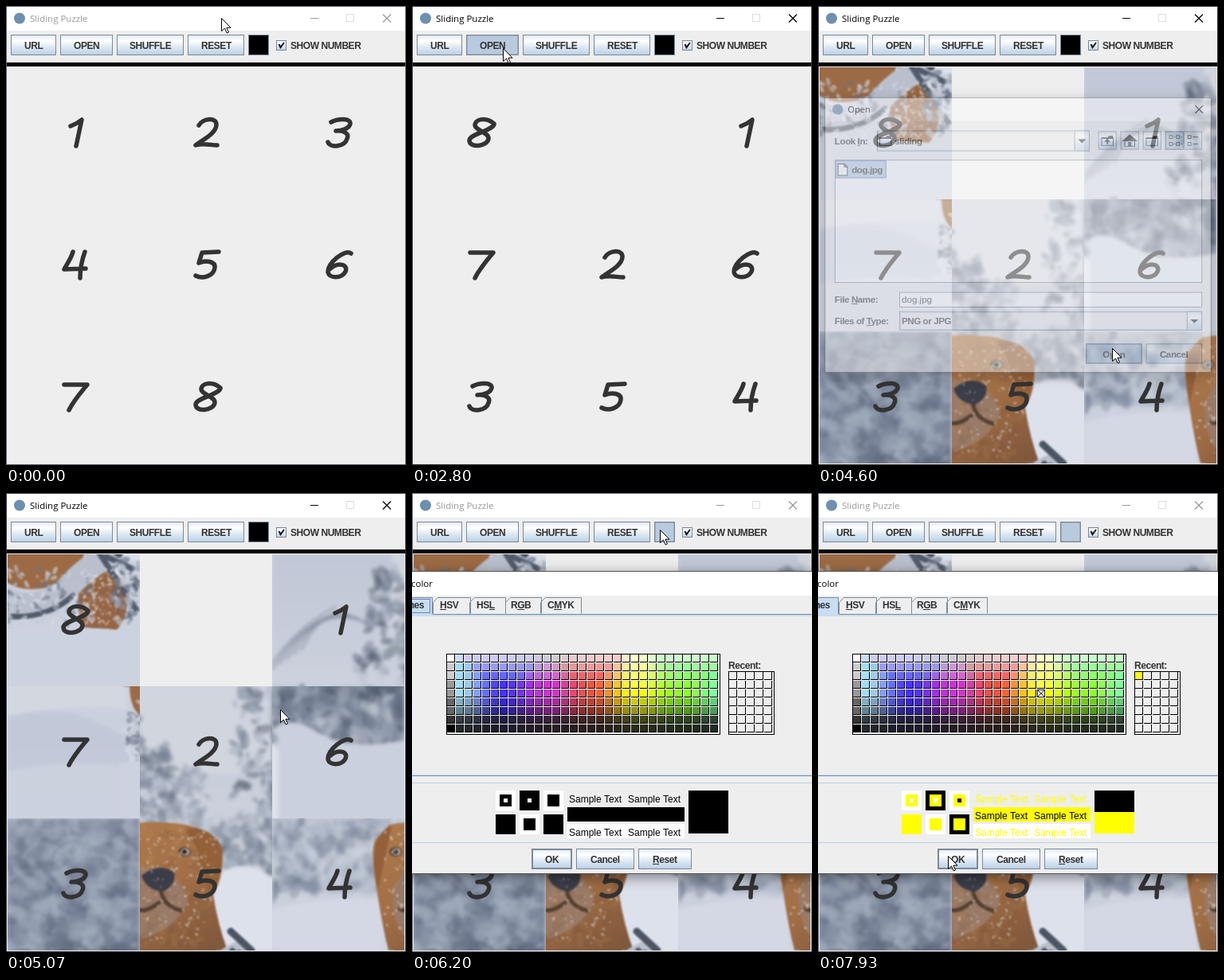
An HTML page with a canvas for the animation above (8 s loop, 502 px wide and 577 px high).

```html
<!DOCTYPE html>
<html lang="en">
<head>
<meta charset="utf-8">
<title>Sliding Puzzle</title>
<style>
html, body { margin: 0; width: 100%; height: 100%; overflow: hidden; background: #eee; }
canvas { display: block; width: 502px; height: 577px; }
</style>
</head>
<body>
<canvas id="stage" width="502" height="577"></canvas>
<script>
const W = 502, H = 577, LOOP = 8000, STEP = 1000 / 15;
const c = document.getElementById('stage').getContext('2d');
const UI = '"Liberation Sans", Arial, sans-serif';
const BOLD = 'bold 12px ' + UI, PLAIN = '12px ' + UI;
const CAPTION = '11.5px "Open Sans", "Noto Sans", sans-serif';
const EDGE = '#7a8a99', PALE = '#b8cfe5', DOWN = '#b9cade', FACE = '#eeeeee', INK = '#333';

// ---- basic helpers ----
function rect(x, y, w, h, fill) { c.fillStyle = fill; c.fillRect(x, y, w, h); }
function frame(x, y, w, h, color, n = 1) {
  c.strokeStyle = color;
  c.lineWidth = n;
  c.strokeRect(x + n / 2, y + n / 2, w - n, h - n);
}
function box(x, y, w, h, fill, edge = EDGE) { rect(x, y, w, h, fill); frame(x, y, w, h, edge); }
function line(color, width, ...p) {
  c.strokeStyle = color;
  c.lineWidth = width;
  c.beginPath();
  for (let i = 0; i < p.length; i += 2) c.lineTo(p[i], p[i + 1]);
  c.stroke();
}
function poly(color, ...p) {
  c.fillStyle = color;
  c.beginPath();
  for (let i = 0; i < p.length; i += 2) c.lineTo(p[i], p[i + 1]);
  c.fill();
}
function text(s, x, y, { font = BOLD, color = INK, align = 'left', mark = -1 } = {}) {
  c.font = font;
  c.letterSpacing = font === BOLD ? '-0.45px' : '0px';
  c.fillStyle = color;
  const w = c.measureText(s).width;
  if (align === 'center') x = Math.round(x - w / 2);
  if (align === 'right') x -= w;
  c.fillText(s, x, y);
  if (mark >= 0) {
    const a = c.measureText(s.slice(0, mark)).width, b = c.measureText(s[mark]).width;
    c.fillRect(Math.round(x + a), y + 1, Math.round(b), 1);
  }
}
function sheen(y, h) {
  const g = c.createLinearGradient(0, y, 0, y + h);
  g.addColorStop(0, '#dde8f3');
  g.addColorStop(.3, '#fff');
  g.addColorStop(.6, '#dde8f3');
  g.addColorStop(1, PALE);
  return g;
}
function button(x, y, w, h, label, state, mark) {
  box(x, y, w, h, state === 'down' ? DOWN : sheen(y, h));
  if (state === 'over') frame(x + 1, y + 1, w - 2, h - 2, PALE, 2);
  if (state === 'main' || state === 'down') frame(x, y, w, h, EDGE, state === 'main' ? 2 : 1.4);
  if (label) text(label, x + w / 2, y + 18, { align: 'center', mark });
}
function cross(x, y, color) {
  line(color, 1.2, x, y, x + 10, y + 10);
  line(color, 1.2, x + 10, y, x, y + 10);
}
function badge(y) {
  c.fillStyle = '#6d8fb0';
  c.beginPath();
  c.arc(17, y, 7, 0, 7);
  c.fill();
}

// ---- picture ----
function makePhoto() {
  const SIZE = 498;
  const sheet = () => {
    const cv = document.createElement('canvas');
    cv.width = cv.height = SIZE;
    return cv;
  };
  const out = sheet(), o = out.getContext('2d');
  let g, seed = 7;
  const layer = (blur, paint) => {
    const cv = sheet();
    g = cv.getContext('2d');
    g.lineCap = 'round';
    paint();
    o.filter = `blur(${blur}px)`;
    o.drawImage(cv, 0, 0);
    o.filter = 'none';
  };
  const rnd = () => (seed = seed * 16807 % 2147483647) / 2147483647;
  const blob = (x, y, rx, ry, color, turn = 0) => {
    g.fillStyle = color;
    g.beginPath();
    g.ellipse(x, y, rx, ry, turn, 0, 7);
    g.fill();
  };
  const scatter = (n, x, y, w, h, r, colors, alpha = .4) => {
    g.globalAlpha = alpha;
    for (let i = 0; i < n; i++) {
      const s = r * (.4 + rnd());
      blob(x + rnd() * w, y + rnd() * h, s, s * .5, colors[i % colors.length], rnd() * 3);
    }
    g.globalAlpha = 1;
  };
  // a tree narrows towards its tip
  const tree = (x, y, w, h, colors) => {
    for (let k = 0; k < 6; k++) {
      const s = w * (.35 + k * .13);
      scatter(18, x + (w - s) / 2, y + h * k / 6, s, h / 6, 9, colors, .45);
    }
  };
  const shape = (d, color) => { g.fillStyle = color; g.fill(new Path2D(d)); };
  const stroke = (d, color, w) => {
    g.strokeStyle = color;
    g.lineWidth = w;
    g.stroke(new Path2D(d));
  };

  o.fillStyle = '#cdd2de';
  o.fillRect(0, 0, SIZE, SIZE);
  layer(2.2, () => {
    const sky = g.createLinearGradient(0, 0, 0, SIZE);
    sky.addColorStop(0, '#c0c7d6');
    sky.addColorStop(.3, '#cbd0dc');
    sky.addColorStop(1, '#ccd1df');
    g.fillStyle = sky;
    g.fillRect(-9, -9, 520, 520);
    shape('M150,-9 H332 V110 H150Z', '#d0d5de');
    for (let i = 0; i < 6; i++)
      stroke(`M${i * 9 - 8},${150 - i * 6} Q${24 + i * 9},${95 - i * 9} ${80 + i * 9},${66 + i * 5}`, 'rgba(128,138,156,.6)', 2.4);
    const fir = ['#4f596a', '#9aa3b3', '#cdd3dd', '#69748a'];
    tree(106, 20, 78, 135, fir);
    tree(150, 75, 78, 130, ['#7c8698', '#b6bdca', '#667083']);
    tree(196, 100, 70, 110, ['#aab2c1', '#d0d5de', '#8690a2']);
    tree(262, -20, 88, 240, fir);
    shape('M-9,148 Q70,142 166,154 V172 H-9Z', 'rgba(206,211,223,.8)');

    shape('M332,-9 H510 V240 H332Z', '#858fa3');
    scatter(330, 332, -5, 170, 172, 13, ['#5b657a', '#9ea8bb', '#78839a', '#b0b9c9'], .35);
    for (let i = 0; i < 9; i++)
      stroke(`M${335 + i * 16},${20 + rnd() * 120} q${20 + rnd() * 20},${-20 - rnd() * 20} 60,${rnd() * 30 - 15}`, 'rgba(180,189,204,.5)', 2.5);
    scatter(130, 332, 164, 166, 78, 14, ['#454f61', '#9ca5b6', '#c4cad7', '#5f6a7e'], .4);
    shape('M332,222 Q352,200 386,222 Q430,250 505,232 V340 H332Z', '#cad0dd');
    shape('M-9,166 H150 V260 H-9Z', '#b0b9c8');
    scatter(150, -5, 168, 150, 95, 12, ['#848fa3', '#c0c7d3', '#717c90', '#d2d7e1'], .38);
    shape('M-9,284 Q60,262 140,268 V340 H-9Z', '#d3d8e4');
    scatter(80, 258, 166, 78, 62, 10, ['#6a7588', '#c3cad5', '#8e98a9']);
    shape('M246,262 Q266,222 300,226 Q322,230 340,246 V340 H246Z', '#dde1eb');
    shape('M-9,328 H150 V360 Q70,352 -9,374Z', '#d2d7e0');
    shape('M-9,372 Q60,352 110,376 T170,410 V436 Q80,420 -9,440Z', 'rgba(178,187,205,.4)');
  });

  layer(1, () => {
    const coat = g.createLinearGradient(150, 170, 250, 332);
    coat.addColorStop(0, '#ad7a4d');
    coat.addColorStop(.5, '#a26f46');
    coat.addColorStop(1, '#80583c');
    shape('M147,174 Q180,168 208,172 Q252,176 268,200 Q274,235 258,262 Q264,300 276,332 H146 Q138,300 132,260 Q122,205 130,192Z', coat);
    shape('M222,177 Q262,178 270,206 Q270,240 256,263 Q242,235 238,205Z', '#936039');
    shape('M130,196 Q142,176 150,176 Q144,205 133,255 Q124,225 130,196Z', '#936039');
    shape('M166,228 Q212,224 226,268 Q218,300 170,318 Q148,296 152,256Z', '#997a66');
    scatter(50, 170, 175, 80, 150, 9, ['#c1915f', '#7a5236'], .15);
    stroke('M192,254 Q194,276 218,282 M190,272 Q172,286 160,280', '#54402f', 5);
    shape('M168,238 Q190,220 209,234 Q212,250 195,258 Q174,256 168,238Z', '#3b3d48');
    for (const x of [155, 222]) {
      blob(x, 208, 8, 6, '#5a3f2a');
      blob(x + 1, 208, 5.5, 4.5, '#aaa7a3');
      blob(x, 208, 2.8, 2.8, '#222');
    }
    shape('M153,332 H262 Q255,362 215,374 Q185,380 166,368 Q154,360 153,332Z', '#9c6b45');
    shape('M262,356 Q292,338 316,372 Q320,410 302,428 L262,424 Q246,390 262,356Z', '#946544');
    stroke('M166,392 Q210,404 240,376 Q262,350 290,336', '#b9bfcc', 30);
    stroke('M166,410 Q215,414 248,384 M282,332 Q300,360 328,402 M290,335 L322,350', '#525b6b', 7);
    scatter(130, 166, 350, 110, 70, 4, ['#dde1e9', '#c0c7d4', '#697385'], .55);
    scatter(60, 296, 335, 34, 85, 6, ['#566074', '#cfd5df', '#8d96a6'], .55);
    scatter(40, 150, 368, 16, 62, 6, ['#737d8e', '#d4d9e3'], .5);
    stroke('M280,308 L306,332', '#4c5564', 9);
    scatter(170, 140, 180, 122, 145, 1.7, ['#eceef3'], .6);
    scatter(110, 258, 350, 48, 70, 1.9, ['#eceef3'], .6);
    shape('M140,428 Q240,418 332,430 V498 H140Z', '#cdd2e0');
  });
  return out;
}
const photo = makePhoto();

// ---- puzzle ----
const DIGITS = [
  'M-4,-8Q4,-11 10,-16L3,17',
  'M-9,-9C-4,-18 14,-20 13,-9C12,2 -6,10 -13,16C-4,13 6,16 14,16',
  'M-9,-13C0,-18 16,-18 15,-11C14,-5 4,-2 -3,-2C8,-3 14,2 11,8C8,18 -10,20 -13,12',
  'M-1,-16C-3,-8 -9,0 -12,6L15,5M14,-16C10,-5 8,5 8,17',
  'M16,-16L-5,-15L-9,-2C0,-6 12,-4 11,4C10,14 -4,19 -13,14',
  'M16,-14C8,-20 -13,-2 -13,9C-12,18 4,18 9,9C13,0 0,-4 -11,6',
  'M-12,-15L17,-15C8,-4 0,5 -6,17',
  'M18,-11C8,-20 -6,-17 -6,-9C-5,-2 12,0 11,8C9,18 -13,20 -13,10C-13,2 15,-2 18,-10'
].map(d => new Path2D(d));

const BOARDS = [[0, '12345678_'], [733, '41628375_'], [1000, '27564_183'],
  [1400, '567_28341'], [1733, '8_1726354']];

function board(t) {
  const order = BOARDS.filter(b => t >= b[0]).pop()[1];
  const pic = t >= 4600;
  c.lineCap = c.lineJoin = 'round';
  [...order].forEach((ch, i) => {
    if (ch === '_') return;
    const n = ch - 1, x = 2 + i % 3 * 166, y = 77 + Math.floor(i / 3) * 166;
    if (pic) c.drawImage(photo, n % 3 * 166, Math.floor(n / 3) * 166, 166, 166, x, y, 166, 166);
    c.save();
    c.translate(x + 83, y + 82);
    c.strokeStyle = INK;
    c.lineWidth = 5.5;
    c.stroke(DIGITS[n]);
    c.restore();
  });
  c.lineCap = 'butt';
  c.lineJoin = 'miter';
}

function mainWindow(t, at) {
  const live = within(t, 667, 2867) || within(t, 4600, 6067);
  const tone = live ? '#000' : '#999';
  rect(0, 0, W, H, live ? '#33383f' : '#5c646e');
  rect(1, 1, 500, 30, '#fff');
  rect(1, 31, 500, 545, FACE);
  badge(15.5);
  text('Sliding Puzzle', 30, 20, { font: CAPTION, color: tone });
  rect(382, 15, 10, 1, tone);
  frame(427, 10, 10, 10, '#ddd');
  cross(473, 10.5, tone);

  const shuffle = [[667, 733], [933, 1000], [1333, 1400], [1600, 1733]].some(([a, b]) => within(t, a, b));
  const free = !within(t, 2867, 4600) && t < 6067;
  const over = (x, w) => free && at[0] >= x && at[0] < x + w && at[1] >= 36 && at[1] < 62 ? 'over' : '';
  button(6, 36, 57, 26, 'URL', over(6, 57));
  button(68, 36, 66, 26, 'OPEN', within(t, 2800, 4600) ? 'down' : over(68, 66));
  button(139, 36, 84, 26, 'SHUFFLE', shuffle ? 'down' : over(139, 84));
  button(228, 36, 71, 26, 'RESET', over(228, 71));
  box(304, 36, 26, 26, t >= 6000 ? DOWN : '#000');
  if (t >= 6000) frame(304, 36, 26, 26, EDGE, 1.4);
  else if (over(304, 26)) frame(305, 37, 24, 24, PALE, 1);
  box(339, 43, 13, 13, sheen(43, 13));
  line('#111', 2, 342.5, 48, 344.5, 52, 349, 46);
  text('SHOW NUMBER', 357, 54);
  rect(1, 71, 500, 5, '#000');
  board(t);
}

// ---- dialogs ----
function panel(x, y, w, h) {
  c.save();
  c.shadowColor = 'rgba(0,0,0,.45)';
  c.shadowBlur = 16;
  c.shadowOffsetY = 4;
  rect(x, y, w, h, '#555');
  c.restore();
  rect(x + 1, y + 1, w - 2, h - 2, FACE);
  rect(x + 1, y + 1, w - 2, 30, '#fff');
}
function folder(x, y) {
  poly('#333', x, y + 2, x + 8, y + 2, x + 10, y, x + 15, y, x + 16, y + 3, x + 16, y + 13, x, y + 13);
  rect(x + 1, y + 4, 14, 8, '#cfe0f2');
  rect(x + 1, y + 4, 14, 2, '#fff');
}
function combo(x, y, w, h) {
  box(x, y, w, h, FACE);
  frame(x + 1, y + 1, w - 2, h - 2, PALE);
  box(x + w - 20, y, 20, h, sheen(y, h));
  const mx = x + w - 10, my = y + h / 2;
  poly('#222', mx - 5, my - 2, mx + 5, my - 2, mx, my + 3);
}
function openDialog(t) {
  const picked = t >= 3667;
  panel(0, 109, 502, 358);
  badge(124.5);
  text('Open', 30, 129, { font: CAPTION, color: '#000' });
  cross(481, 119.5, '#000');

  text('Look In:', 13, 170, { mark: 5 });
  combo(68, 152, 276, 27);
  folder(71, 159);
  text('sliding', 91, 170);
  for (const x of [355, 384, 413, 442, 466]) button(x, 153, 24, 24, '', x === 442 ? 'down' : '');
  folder(359, 159);
  poly('#333', 367, 162, 371, 167, 368, 167, 368, 170, 366, 170, 366, 167, 363, 167);
  poly('#333', 396, 157, 406, 166, 386, 166);
  box(389, 165, 14, 8, '#cfe0f2', '#333');
  rect(394, 167, 4, 6, '#333');
  folder(417, 159);
  for (const y of [158, 167]) {
    for (const x of [447, 456]) { frame(x, y, 5, 5, '#333'); rect(x + 6, y + 2, 2, 1, '#333'); }
    frame(471, y, 5, 5, '#333');
    rect(478, y + 2, 7, 1, '#333');
  }

  box(13, 190, 477, 160, '#fff');
  if (picked) box(14, 191, 66, 23, PALE, '#6382bf');
  poly('#333', 17, 195, 26, 195, 30, 199, 30, 211, 17, 211);
  poly('#fff', 18, 196, 25, 196, 29, 200, 29, 210, 18, 210);
  line('#333', 1, 25.5, 195, 25.5, 199.5, 30, 199.5);
  text('dog.jpg', 35, 207);

  text('File Name:', 13, 376, { mark: 5 });
  box(97, 362, 393, 20, '#fff');
  if (picked) text('dog.jpg', 100, 376, { font: PLAIN });
  else rect(99, 365, 1, 14, INK);
  text('Files of Type:', 13, 404, { mark: 9 });
  combo(97, 387, 393, 25);
  text('PNG or JPG', 100, 404);
  button(339, 429, 73, 26, 'Open', t >= 4533 ? 'down' : 'main');
  button(417, 429, 73, 26, 'Cancel');
}

const HUES = [[165, 220, 242], [70, 50, 255], [205, 50, 215], [242, 82, 58],
  [255, 255, 0], [145, 255, 30], [125, 255, 170]];
const GRAYS = [255, 204, 204, 153, 153, 102, 102, 51, 0];

function swatch(col, row) {
  if (!col) return `rgb(${GRAYS[row]},${GRAYS[row]},${GRAYS[row]})`;
  const j = col - 1, k = Math.floor(j / 5), f = smooth(j % 5 / 5);
  const rgb = HUES[k].map((v, i) => {
    v += (HUES[k + 1][i] - v) * f;
    if (row < 4) return Math.max(v, 204 - 51 * row);
    if (row === 4) return v;
    const dim = v * (9 - row) / 5;
    return row > 6 ? dim * .45 + 22 : dim;
  });
  return `rgb(${rgb.map(Math.round)})`;
}
function cells(x, y, cols, rows, paint) {
  frame(x - 1, y - 1, cols * 11 + 3, rows * 11 + 3, '#000');
  for (let r = 0; r < rows; r++) for (let k = 0; k < cols; k++) {
    rect(x + k * 11, y + r * 11, 10, 10, '#000');
    rect(x + k * 11, y + r * 11, 9, 9, paint(k, r));
  }
}
function tab(x, w, label, tx, mark) {
  line(EDGE, 1, x + .5, 151.5, x + .5, 137.5, x + 6.5, 131.5, x + w + .5, 131.5, x + w + .5, 151.5);
  text(label, tx, 145, { mark });
}
function colorDialog(t) {
  const picked = t >= 7067, color = picked ? '#ff0' : '#000';
  panel(-70, 98, 600, 381);
  text('Pick color', 26, 118, { font: CAPTION, color: '#000', align: 'right' });

  rect(-66, 152, 592, 1, EDGE);
  rect(-66, 153, 592, 2, '#c8ddf2');
  poly('#c8ddf2', -60, 155, -60, 137, -54, 131, 26, 131, 26, 155);
  line(EDGE, 1, -54, 131.5, 25.5, 131.5, 25.5, 152);
  if (!picked) frame(-53, 133, 76, 18, '#6382bf');
  text('Swatches', 15, 145, { align: 'right', mark: 0 });
  tab(26, 47, 'HSV', 35, 0);
  tab(72, 45, 'HSL', 81, 2);
  tab(117, 45, 'RGB', 124, 1);
  tab(161, 51, 'CMYK', 170, 1);

  cells(44, 203, 31, 9, swatch);
  if (picked) {
    rect(275, 247, 10, 10, '#ffc');
    frame(275, 247, 10, 10, '#223');
    line('#223', 1, 275, 247, 285, 257);
    line('#223', 1, 285, 247, 275, 257);
  }
  text('Recent:', 397, 221);
  cells(398, 225, 5, 7, (k, r) => picked && !k && !r ? '#ff0' : FACE);

  rect(-66, 355, 592, 1, '#6f8fb8');
  rect(-66, 354, 592, 1, '#c8ddf2');
  rect(-66, 364, 592, 1, PALE);
  text('Preview', -2, 368, { align: 'right' });
  const square = (x, y, outer, inner) => {
    rect(x, y, 25, 25, outer);
    rect(x + 5, y + 5, 15, 15, color);
    if (inner) rect(x + 10, y + 10, 5, 5, inner);
  };
  square(105, 374, '#fff', '#fff');
  square(135, 374, '#000', '#fff');
  square(165, 374, '#fff', '#000');
  square(105, 404, color);
  square(135, 404, '#fff');
  square(165, 404, '#000');
  rect(195, 395, 147, 18, color);
  rect(195, 416, 147, 18, '#fff');
  for (const x of [197, 271]) [389, 410, 431].forEach((y, i) =>
    text('Sample Text', x, y, { font: PLAIN, color: i === 1 ? '#000' : color }));
  rect(347, 374, 50, 27, '#000');
  rect(347, 401, 50, 27, color);

  rect(-66, 439, 592, 1, PALE);
  button(150, 447, 51, 26, 'OK', 'main');
  button(206, 447, 73, 26, 'Cancel');
  button(284, 447, 67, 26, 'Reset', '', 0);
}

// ---- motion ----
const PATH = [[0, 270, 15], [533, 197, 45], [1733, 197, 45], [2133, 114, 53], [3067, 114, 53],
  [3600, 56, 202], [3733, 56, 202], [4467, 369, 430], [4733, 369, 430], [5067, 344, 272],
  [5333, 369, 61], [5800, 311, 46], [6200, 311, 46], [6800, 295, 243], [7000, 279, 252],
  [7067, 279, 252], [7333, 340, 251], [7400, 340, 251], [7933, 163, 456], [8000, 163, 456]];

function within(t, a, b) { return t >= a && t < b; }
function smooth(u) { return u * u * (3 - 2 * u); }

function pointer(t) {
  const i = Math.max(1, PATH.findIndex(p => p[0] > t));
  const [t0, x0, y0] = PATH[i - 1], [t1, x1, y1] = PATH[i];
  const u = (t - t0) / (t1 - t0), e = (u + smooth(u)) / 2;
  return [Math.round(x0 + (x1 - x0) * e), Math.round(y0 + (y1 - y0) * e)];
}
function arrow([x, y]) {
  c.beginPath();
  for (const [px, py] of [[0, 0], [0, 16], [4, 12.5], [6.7, 18.5], [9, 17.5], [6.4, 11.7], [11.5, 11.7]])
    c.lineTo(x + px + .5, y + py + .5);
  c.closePath();
  c.fillStyle = '#fff';
  c.fill();
  c.strokeStyle = '#000';
  c.lineWidth = 1;
  c.stroke();
}
const scene = Object.assign(document.createElement('canvas'), { width: W, height: H });

function popup(draw, t, cx, cy, alpha) {
  if (alpha >= 1) return draw(t);
  // keep the scene, paint the dialog over it, then blend the scene back
  scene.getContext('2d').drawImage(c.canvas, 0, 0);
  const s = .94 + .06 * alpha;
  c.save();
  c.translate(cx, cy);
  c.scale(s, s);
  c.translate(-cx, -cy);
  draw(t);
  c.restore();
  c.save();
  c.globalAlpha = 1 - alpha;
  c.drawImage(scene, 0, 0);
  c.restore();
}
function fade(t, start) { return t < start + 66 ? .45 : t < start + 132 ? .85 : 1; }

function render(ms) {
  const t = Math.floor((ms + 5) / STEP) * STEP + .5;
  const at = pointer(Math.min(t, LOOP - 1));
  mainWindow(t, at);
  if (within(t, 2867, 4667)) popup(openDialog, t, 251, 288, t >= 4600 ? .45 : fade(t, 2867));
  if (t >= 6067) popup(colorDialog, t, 230, 290, fade(t, 6067));
  arrow(at);
}
const start = performance.now();
function tick() {
  render((performance.now() - start) % LOOP);
  requestAnimationFrame(tick);
}
tick();
</script>
</body>
</html>
```
